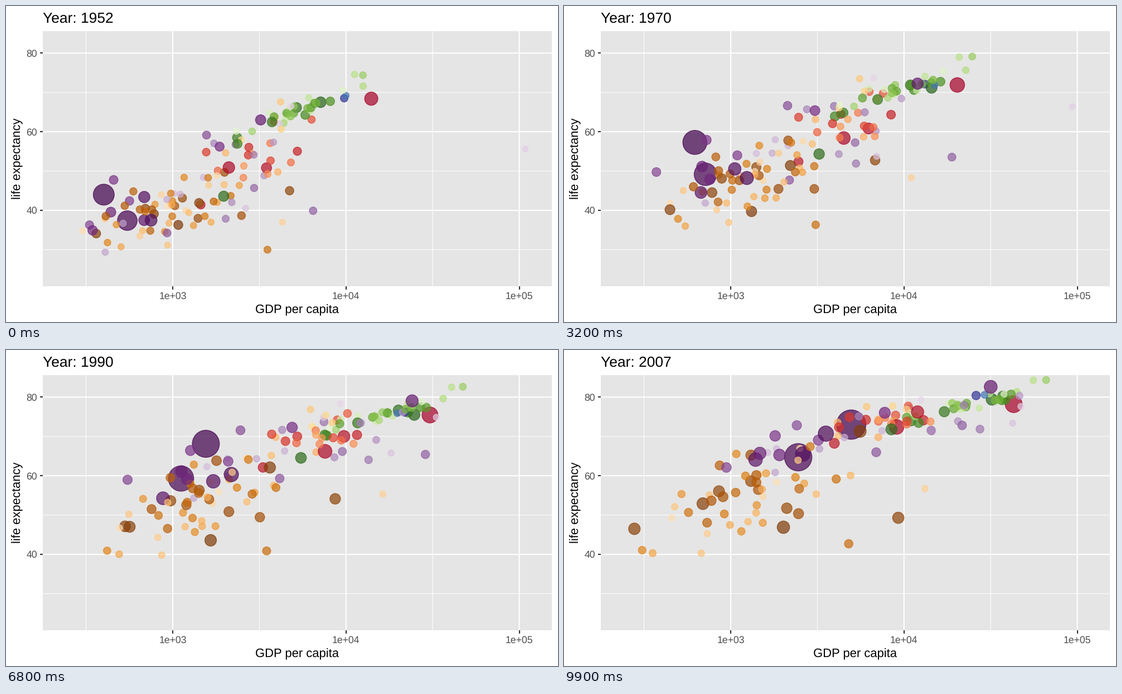
Recreate the animation shown at these times as a matplotlib script. Size 990x566 px, loop 10000 ms.

```python
import numpy as np
import matplotlib.pyplot as plt
from matplotlib.animation import FuncAnimation
from matplotlib.colors import LinearSegmentedColormap

W, H, DPI = 990, 566, 128
FRAMES, START, END = 100, 1952, 2007
LEFT, RIGHT, TOP, BOTTOM = 66, 979, 45, 502
XLIM, YLIM = (2.2502, 5.1882), (20.7, 85.58)
T = np.linspace(0, 1, 12)  # one knot every five years
MAX_POP = 1318
rng = np.random.default_rng(11)

plt.rcParams["font.family"] = "Liberation Sans"
plt.rcParams["text.hinting"] = "none"


def pt(px):
    return px * 72 / DPI


def keyed(points):
    """Path through a few evenly timed (GDP, life expectancy) points."""
    gdp, life = np.array(points, float).T
    t = np.linspace(0, 1, len(points))
    return np.interp(T, t, np.log10(gdp)), np.interp(T, t, life)


def place(cloud, wealth, health):
    """Point in a correlated cloud of log GDP and life expectancy."""
    gdp, gdp_sd, life, life_sd, corr = cloud
    mix = corr * wealth + np.sqrt(1 - corr ** 2) * health
    return gdp + gdp_sd * wealth, life + life_sd * mix


def drift(first, last, bulge):
    """Random path from one cloud to another, rising faster early on."""
    wealth, health, luck = np.clip(rng.normal(size=3), -1.8, 1.8)
    x0, y0 = place(first, wealth, health)
    x1, y1 = place(last, 0.8 * wealth + 0.6 * luck, health)
    arc = 4 * T * (1 - T)
    x = x0 + (x1 - x0) * T + bulge[0] * arc + rng.normal(0, 0.025, T.size)
    y = y0 + (y1 - y0) * T + bulge[1] * arc + rng.normal(0, 0.3, T.size)
    return x, y


def region(count, colors, pop, growth, first, last, bulge, giants=(), keys={}):
    """Bubbles of one region, by falling population in millions."""
    ramp = LinearSegmentedColormap.from_list("", colors.split())
    out = []
    for k in range(count):
        x, y = keyed(keys[k]) if k in keys else drift(first, last, bulge)
        top = (giants[k] if k < len(giants)
               else pop[0] * np.exp(-pop[1] * (k - len(giants))))
        size = 2 + 10 * np.sqrt(top * (1 + (growth - 1) * T) / growth / MAX_POP)
        layer = rng.random() - (top > 1000)
        out.append((layer, x, y, size, ramp(k / (count - 1))))
    return out


# Clouds: mean and spread of log GDP, of life expectancy, and correlation.
africa = region(
    52, "#7f3b08 #b35806 #e08214 #fdb863 #fee0b6", (110, 0.09), 3.9,
    first=(2.95, 0.24, 39.1, 4.8, 0.35), last=(3.07, 0.34, 53.5, 7, 0.35),
    bulge=(0.1, 3.2),
    keys={0: [(1077, 36.3), (2014, 46.9)],
          1: [(1419, 41.9), (5581, 71.3)],
          2: [(362, 34.1), (691, 52.9)],
          3: [(781, 39.1), (780, 47.5), (278, 46.5)],
          4: [(4725, 45), (8320, 57), (9270, 49.3)],
          19: [(3521, 30), (2880, 39.8), (4797, 42.7)],
          46: [(4293, 37), (18500, 54.5), (13206, 56.7)]})

americas = region(
    25, "#a50026 #d73027 #f46d43 #fdae61 #fee090", (45, 0.15), 2.2,
    first=(3.47, 0.17, 53, 7.5, 0.5), last=(3.87, 0.2, 73.5, 3.4, 0.6),
    bulge=(0.07, 2.7), giants=(301, 190, 109),
    keys={0: [(13990, 68.4), (24900, 73.8), (42952, 78.2)],
          1: [(2109, 50.9), (6800, 62.5), (9066, 72.4)],
          2: [(3478, 50.8), (8600, 66.3), (11978, 76.2)]})

asia = region(
    33, "#40004b #762a83 #9970ab #c2a5cf #e7d4e8", (223, 0.19), 2.4,
    first=(3.17, 0.33, 47.5, 8, 0.6), last=(3.8, 0.45, 71.5, 5.3, 0.8),
    bulge=(0.05, 3.5), giants=(1318, 1110),
    keys={0: [(400, 44), (510, 47.3), (702, 63.5), (1210, 66.6),
              (2150, 70.1), (4959, 73)],
          1: [(547, 37.4), (717, 49.7), (1040, 59.1), (2452, 64.7)],
          2: [(750, 37.5), (3541, 70.7)],
          3: [(685, 43.4), (2606, 65.5)],
          4: [(684, 37.5), (668, 48.4), (1391, 64.1)],
          5: [(3217, 63), (13000, 72.7), (24000, 78.9), (31656, 82.6)],
          11: [(331, 36.3), (397, 57.1), (944, 62.1)],
          14: [(6460, 39.9), (34000, 61), (21655, 72.8)],
          31: [(108382, 55.6), (98500, 66.9), (30300, 74.9), (47307, 77.6)]})

europe = region(
    30, "#276419 #4d9221 #7fbc41 #b8e186 #e6f5d0", (82, 0.15), 1.35,
    first=(3.73, 0.21, 65.8, 4, 0.85), last=(4.35, 0.22, 78, 2.5, 0.85),
    bulge=(0.07, 1.7),
    keys={0: [(7144, 67.5), (21200, 73.2), (32170, 79.4)],
          1: [(1969, 43.6), (4250, 60.2), (8458, 71.8)]})

oceania = region(
    2, "#313695 #4575b4", (20, 1.6), 2.2,
    first=(4.01, 0.01, 69.2, 0.2, 0), last=(4.47, 0.07, 80.7, 0.5, 0.8),
    bulge=(0.02, -1))

bubbles = sorted(africa + americas + asia + europe + oceania,
                 key=lambda b: b[0])
XS, YS, SIZES = (np.array([b[i] for b in bubbles]) for i in (1, 2, 3))

fig = plt.figure(figsize=(W / DPI, H / DPI), dpi=DPI, facecolor="white")
ax = fig.add_axes([LEFT / W, 1 - BOTTOM / H, (RIGHT - LEFT) / W,
                   (BOTTOM - TOP) / H], facecolor="#e5e5e5")
ax.set(xlim=XLIM, ylim=YLIM, xticks=[3, 4, 5], yticks=[40, 60, 80])
ax.spines[:].set_visible(False)
ax.tick_params(length=pt(5.5), width=pt(2.1), color="#333333",
               labelbottom=False, labelleft=False)
for ticks, line in (([3, 4, 5], ax.axvline), ([40, 60, 80], ax.axhline)):
    half = (ticks[1] - ticks[0]) / 2
    for v in ticks:
        line(v - half, color="white", lw=pt(1.07), zorder=0.5, snap=False)
        line(v, color="white", lw=pt(2.13), zorder=0.6, snap=False)


def label(x, y, text, px, color="black", ha="center", **kw):
    return fig.text(x / W, 1 - y / H, text, fontsize=pt(px), color=color,
                    ha=ha, va="baseline", **kw)


for i in range(3):
    label(299 + 310.75 * i, 524.5, f"1e+0{3 + i}", 17.6, "#4d4d4d")
    label(56.1, 90.6 + 140.85 * i, f"{80 - 20 * i}", 17.6, "#4d4d4d", "right")
label(522.5, 550.3, "GDP per capita", 22)
label(26.75, 273.5, "life expectancy", 22, rotation=90, rotation_mode="anchor")
title = label(66, 29.9, "", 26.4, ha="left")

dots = ax.scatter(XS[:, 0], YS[:, 0], c=[b[4] for b in bubbles], alpha=0.7,
                  linewidths=pt(1.42), zorder=2)


def draw(i):
    pos = (T.size - 1) * i / (FRAMES - 1)
    k = min(int(pos), T.size - 2)
    x, y, size = (a[:, k] + (pos - k) * (a[:, k + 1] - a[:, k])
                  for a in (XS, YS, SIZES))
    dots.set_offsets(np.column_stack([x, y]))
    dots.set_sizes(pt(1.5 * (size * 2.845 + 0.945)) ** 2)
    title.set_text(f"Year: {START + (END - START) * i / (FRAMES - 1):.0f}")
    return dots, title


anim = FuncAnimation(fig, draw, frames=FRAMES, interval=100, repeat=True,
                     repeat_delay=0, blit=False)
plt.show()
```
